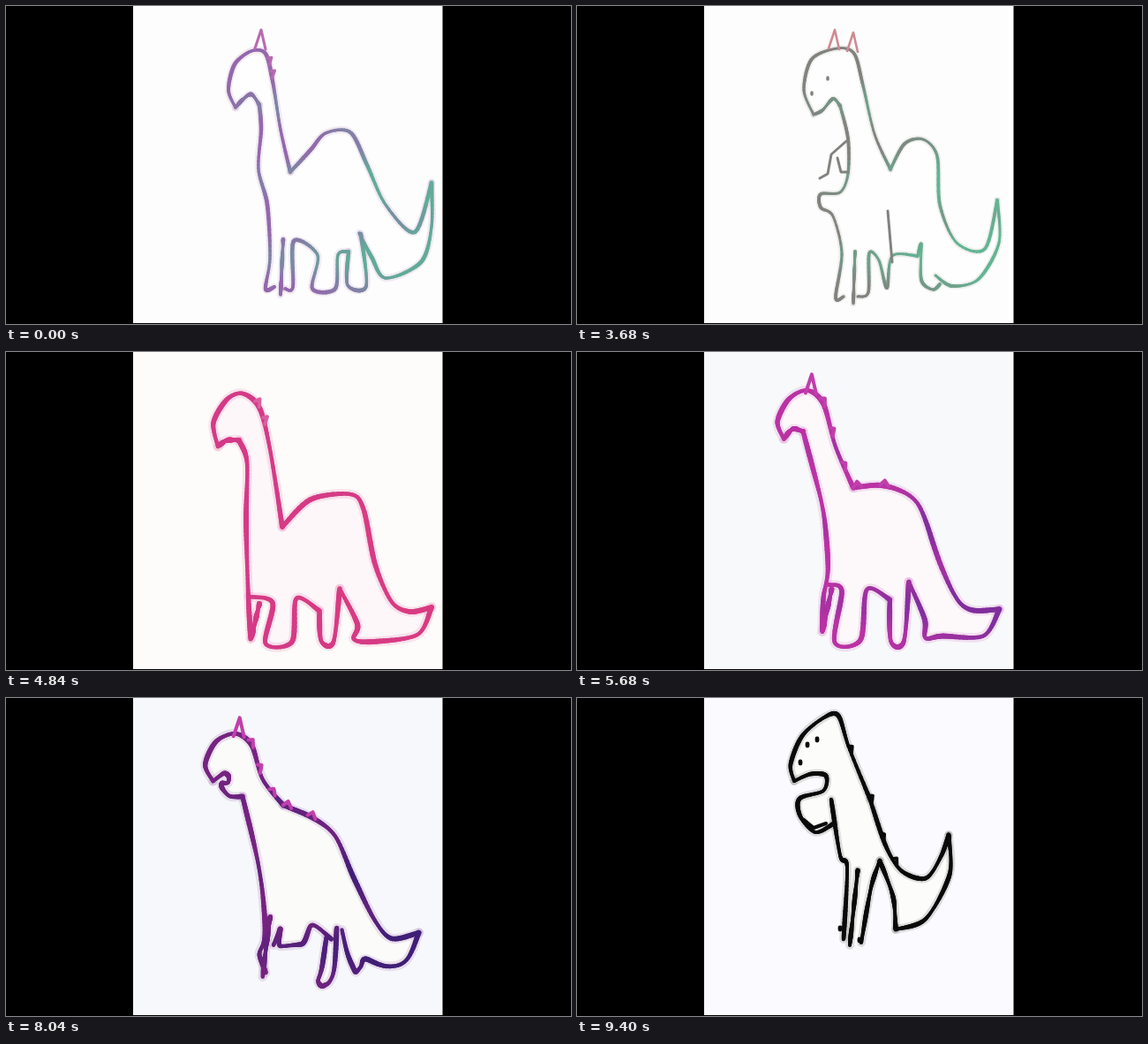
An HTML page with a canvas for the animation above (9560 ms loop, 640x360 px).

```html
<!DOCTYPE html>
<html lang="en">
<head>
<meta charset="utf-8">
<title>Sketched dinosaur</title>
<style>
html, body { margin: 0; width: 100%; height: 100%; overflow: hidden; background: #000; }
canvas { display: block; width: 640px; height: 360px; }
</style>
</head>
<body>
<canvas id="stage" width="640" height="360"></canvas>
<script>
const LOOP = 9560, SAMPLES = 64;
const ctx = document.getElementById('stage').getContext('2d');

// Key points of each pose: chest | mouth | head | back | tail | front legs | rear leg | shin.
// ink blends from left to right; ridge is a row of spikes along part of the spine.
const poses = [
  {
    bg: '#fefdfd', fill: '#fefefe', ink: ['#9468ac', '#62ab99'], trim: '#b86bb0', width: 4.2,
    body: `304,318 294,320 299,285 296,225 286,185 289,140 287,112 | 287,112 278,100 268,106 260,115
      | 260,115 252,95 259,66 278,51 294,54 302,85 311,140 322,188
      | 322,188 345,163 362,144 390,143 409,180 430,225 463,256 482,200
      | 482,200 482,250 470,290 430,308 414,284 400,257
      | 316,320 325,318 326,266 353,282 347,320 373,320 376,282 388,278
      | 388,278 387,316 408,317 402,258 | 314,264 311,327`,
    ears: '288,48', ridge: { count: 2, from: .31, to: .34, tall: 7, half: 4 }
  },
  {
    bg: '#fdfdfd', fill: '#fefefe', ink: ['#82827f', '#62b594'], trim: '#cf8a92', width: 3.6,
    body: `293,327 302,300 297,225 300,195 297,165 302,140 297,113 | 297,113 291,105 282,115 268,123
      | 268,123 259,97 269,63 292,51 314,55 324,95 337,145 354,183
      | 354,183 366,157 388,150 405,163 413,205 424,242 459,266 477,197
      | 477,197 481,245 467,295 432,311 416,303 409,290
      | 318,326 328,322 328,278 344,285 346,322 364,322 365,283
      | 366,283 388,280 397,311 409,290 | 316,272 313,334`,
    ears: '290,51 311,53', dots: '283,84', extra: '298,155 289,173'
  },
  {
    bg: '#fdfdfd', fill: '#fefefe', ink: ['#82827f', '#62b594'], trim: '#cf8a92', width: 3.5,
    body: `302,329 293,330 300,280 290,238 276,228 276,213 298,211 307,190 307,150 298,113
      | 298,113 290,105 278,118 268,123
      | 268,123 257,95 266,60 295,48 314,54 324,90 337,145 355,185
      | 355,185 371,156 392,151 408,170 411,225 430,268 462,275 476,220
      | 476,220 478,268 455,309 425,317 406,305
      | 318,329 330,324 331,280 342,288 351,319 357,283 386,283
      | 386,283 390,270 390,310 403,321 411,315 | 315,278 313,337`,
    ears: '291,48 312,51', dots: '284,82 266,99',
    extra: '305,153 288,168 284,190 275,195 | 295,172 299,188 307,188 | 352,232 357,290'
  },
  {
    bg: '#fdfcfa', fill: '#fdf7fa', ink: ['#d43b87', '#d83c82'], trim: '#d9609f', width: 5.4,
    body: `277,325 274,265 272,190 273,125 264,100 | 264,100 250,100 240,107
      | 240,107 235,80 250,54 268,47 287,63 299,110 313,198
      | 313,198 345,167 390,161 405,178 418,240 437,283 458,294 482,289
      | 482,289 466,320 415,328 394,325 398,308 378,268
      | 275,277 302,284 294,330 324,328 329,279 355,293
      | 355,293 357,327 371,328 378,268 | 287,285 278,324`,
    ridge: { count: 2, from: .32, to: .37, tall: 7, half: 4 }
  },
  {
    bg: '#f6f8fc', fill: '#fdfafc', ink: ['#b030b0', '#5c2aa8'], trim: '#c03fac', width: 5.4,
    body: `278,312 281,278 289,255 284,205 270,155 253,86 | 253,86 242,82 232,95
      | 232,95 224,78 236,53 258,42 276,57 290,105 313,136
      | 313,136 350,147 380,173 400,220 424,272 442,291 477,292
      | 477,292 458,322 413,319 395,323 392,300 375,257
      | 289,258 299,265 291,328 320,325 328,265 354,275
      | 354,275 355,328 370,327 375,257 | 289,262 278,314`,
    ears: '262,45', ridge: { count: 5, from: .33, to: .58, tall: 6, half: 5 }
  },
  {
    bg: '#f8f8fd', fill: '#f9fdf8', ink: ['#24143f', '#1a1034'], trim: '#3a2068', width: 5.2,
    body: `316,309 293,310 301,285 297,190 288,146
      | 288,146 258,147 243,130 246,117 266,113 272,90 263,77 238,93
      | 238,93 228,72 240,45 262,38 281,48 292,75 316,102
      | 316,102 345,121 364,135 385,180 408,222 430,247 455,230
      | 455,230 442,266 418,278 403,263 409,278 398,306 388,298 388,270
      | 322,309 328,245 345,208 368,240 388,270
      | 375,264 365,293 349,306 350,317 370,316 374,265 | 313,229 311,265 308,318`,
    dots: '239,73', ridge: { count: 6, from: .34, to: .75, tall: 23, half: 8 }
  },
  {
    bg: '#fbfafe', fill: '#fcfdfa', ink: ['#0a0a0a', '#0a0a0a'], trim: '#0a0a0a', width: 4.8,
    body: `302,273 306,192 298,178 288,115
      | 291,142 270,152 253,134 252,114 279,105 282,88 265,86 246,94
      | 246,94 242,75 255,43 280,22 296,20 308,56 332,115
      | 332,115 350,168 368,196 395,204 412,180 421,155
      | 421,155 422,200 395,250 361,262
      | 322,277 333,215 343,184 | 343,184 358,225 361,262 | 318,195 309,280`,
    dots: '261,53 272,47 253,73 298,261 320,274', extra: '257,138 268,147 282,142',
    ridge: { count: 4, from: .425, to: .66, tall: 6, half: 5 }
  }
];

// [time, place along the poses, time of the rougher first step]
const keys = [
  [0, 0], [480, .2], [1320, 1, 1280], [2600, 1.4], [3680, 2],
  [3960, 2.35, 3920], [4200, 2.7, 4160], [4600, 2.85, 4560], [4840, 3, 4800],
  [5160, 3.25, 5120], [5440, 3.5, 5400], [5720, 3.75, 5680], [6000, 3.9, 5960],
  [6240, 4, 6200], [8080, 4.5, 8040], [8360, 5, 8320], [8640, 5.35, 8600],
  [9160, 5.7, 9040], [9400, 6, 9360]
];

const mix = (a, b, t) => a + (b - a) * t;
const mixAll = (a, b, t) => a.map((v, i) => mix(v, b[i], t));
const clamp = t => Math.max(0, Math.min(1, t));
const points = s => s ? s.trim().split(/\s+/).map(p => p.split(',').map(Number)) : [];
const strokes = s => s ? s.split('|').map(points) : [];
const rgb = h => [1, 3, 5].map(i => parseInt(h.slice(i, i + 2), 16));
const css = c => `rgb(${c.map(Math.round)})`;

function spline(pts) {
  const last = pts.length - 1, tension = .45;
  return Array.from({ length: SAMPLES + 1 }, (_, n) => {
    const u = n / SAMPLES * last, i = Math.min(last - 1, Math.floor(u)), t = u - i;
    const a = pts[Math.max(0, i - 1)], b = pts[i], c = pts[i + 1], d = pts[Math.min(last, i + 2)];
    const t2 = t * t, t3 = t2 * t, ease = 3 * t2 - 2 * t3;
    return [0, 1].map(k => mix(b[k], c[k], ease) +
      (t3 - 2 * t2 + t) * tension * (c[k] - a[k]) + (t3 - t2) * tension * (d[k] - b[k]));
  });
}

// Remembers the nearest outline sample, so a detail can follow the body.
function pin(pts, outline) {
  const far = q => Math.hypot(q[0] - pts[0][0], q[1] - pts[0][1]);
  const index = outline.reduce((best, q, i) => far(q) < far(outline[best]) ? i : best, 0);
  return { pts, index, base: outline[index] };
}

for (const p of poses) {
  p.lines = strokes(p.body).map(spline);
  const outline = p.lines.flat(), pinned = pts => pin(pts, outline);
  p.ears = points(p.ears).map(([x, y]) => pinned([[x - 6, y], [x + 1, y - 21], [x + 6, y + 1]]));
  p.dots = points(p.dots).map(([x, y]) => pinned([[x, y - 1], [x, y + 1]]));
  p.extra = strokes(p.extra).map(pinned);
  p.bg = rgb(p.bg);
  p.fill = rgb(p.fill);
  p.ink = p.ink.map(rgb);
}

function line(pts, color, width) {
  ctx.beginPath();
  pts.forEach(q => ctx.lineTo(...q));
  ctx.strokeStyle = color;
  ctx.lineWidth = width;
  ctx.stroke();
}

function drawRidge({ count, from, to, tall, half }, spine, color, width) {
  for (let i = 0; i < count; i++) {
    const n = Math.round(mix(from, to, i / (count - 1)) * (spine.length - 1));
    const [x, y] = spine[n], a = spine[n - 2], b = spine[n + 2];
    const angle = Math.atan2(b[1] - a[1], b[0] - a[0]);
    const dx = Math.cos(angle), dy = Math.sin(angle), h = tall * (1 + .15 * Math.sin(i * 2.3));
    line([[x - dx * half, y - dy * half], [x + dy * h / 2, y - (dx + 1) * h / 2],
      [x + dx * half, y + dy * half]], color, width);
  }
}

function draw(place) {
  const i = Math.min(poses.length - 2, Math.floor(place)), t = place - i;
  const a = poses[i], b = poses[i + 1], near = t < .5 ? a : b;
  const lines = a.lines.map((l, k) => l.map((q, n) => mixAll(q, b.lines[k][n], t)));
  const width = mix(a.width, b.width, t);
  const ink = a.ink.map((c, k) => mixAll(c, b.ink[k], t));
  const [chest, mouth, head, back, tail, front, rear] = lines;

  ctx.filter = 'none';
  ctx.fillStyle = '#000';
  ctx.fillRect(0, 0, 640, 360);
  ctx.fillStyle = css(mixAll(a.bg, b.bg, t));
  ctx.fillRect(144, 0, 350.5, 359);
  ctx.lineCap = ctx.lineJoin = 'round';

  ctx.beginPath();
  [chest, mouth, head, back, tail, [...rear].reverse(), [...front].reverse()].flat()
    .forEach(q => ctx.lineTo(...q));
  ctx.fillStyle = css(mixAll(a.fill, b.fill, t));
  ctx.fill();

  // Soft marker halo, then the uneven line itself.
  ctx.globalAlpha = .13;
  lines.forEach(l => line(l, css(ink[0]), width * 2));
  ctx.globalAlpha = 1;
  lines.forEach((l, k) => {
    for (let n = 0; n < SAMPLES; n++) {
      const [x, y] = l[n], shade = clamp((x - 290) / 160 + .35 * Math.sin(y / 14));
      line([l[n], l[n + 1]], css(mixAll(ink[0], ink[1], shade)),
        width * (.95 + .15 * Math.sin(n * .25 + k * 2)));
    }
  });

  const outline = lines.flat(), main = css(ink[0]);
  const detail = (list, color, w) => list.forEach(({ pts, index, base }) => {
    const [x, y] = outline[index];
    line(pts.map(q => [q[0] + x - base[0], q[1] + y - base[1]]), color, w);
  });
  detail(near.extra, main, width * .85);
  detail(near.dots, main, width);
  detail(near.ears, near.trim, width * .75);
  if (near.ridge) drawRidge(near.ridge, [...head, ...back.slice(1)], near.trim, width * .75);
}

function placeAt(ms) {
  let place = 0;
  for (const [time, next, early] of keys) {
    if (ms >= time) place = next;
    else if (ms >= early) place = mix(place, next, .85);
  }
  return place;
}

let shown = -1;
const start = performance.now();
function tick() {
  const place = placeAt((performance.now() - start) % LOOP);
  if (place !== shown) draw(shown = place);
  requestAnimationFrame(tick);
}
tick();
</script>
</body>
</html>
```
